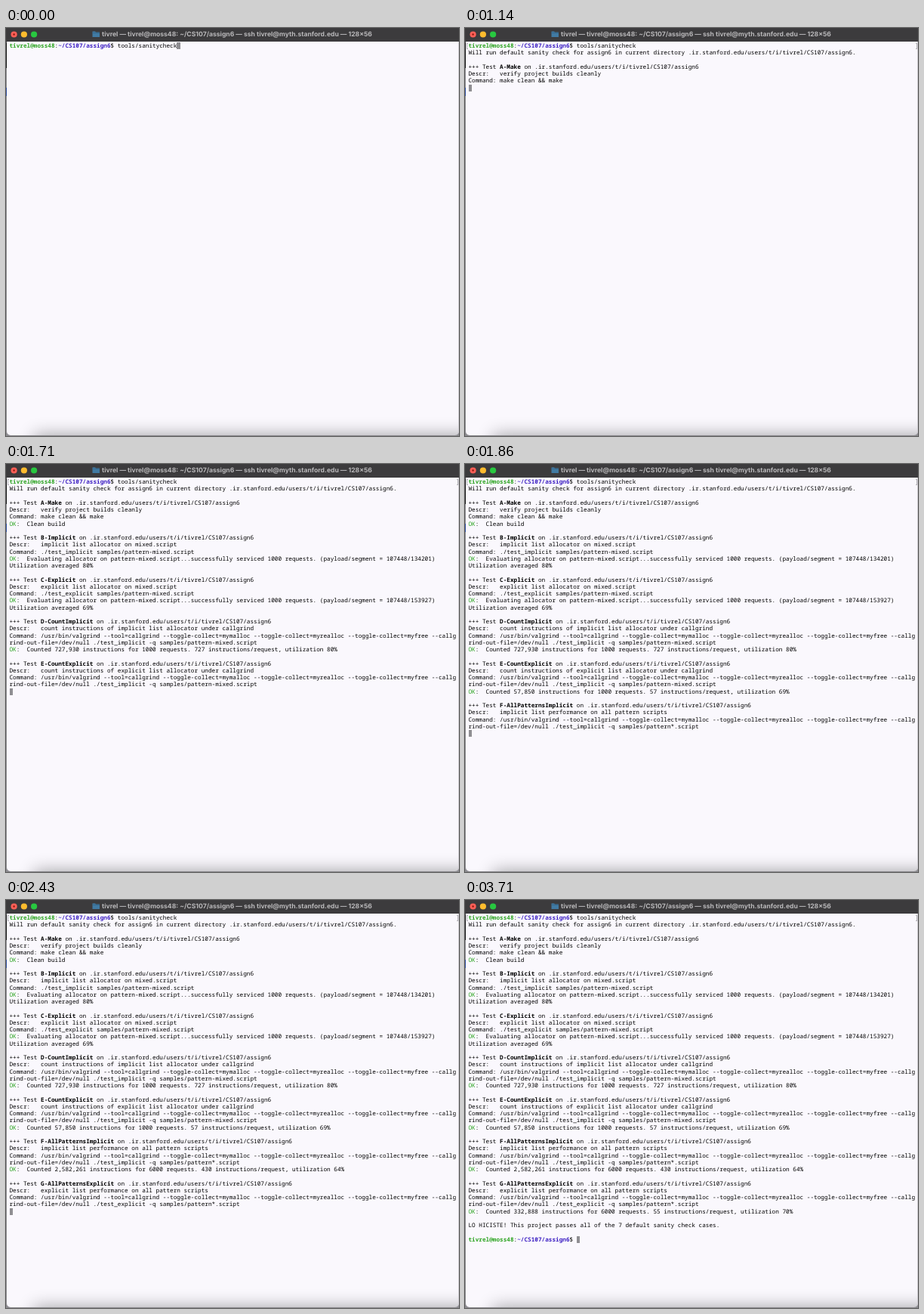
Recreate the animation shown at these times as an HTML page. Size 600 by 540 pixels, loop 4010 ms.

```html
<!DOCTYPE html>
<html lang="en">
<head>
<meta charset="utf-8">
<title>Sanity check</title>
<style>
  html, body { margin: 0; width: 100%; height: 100%; overflow: hidden; }
  body {
    position: relative;
    background: linear-gradient(#3c3b3d 20px, #111 20px 53px, #8b8a8e 53px 79px, #2c4c9c 79px 90px, #8b8a8e 90px);
    text-rendering: geometricPrecision;
  }
  body * { position: absolute; box-sizing: border-box; }
  #bar { width: 600px; height: 18px; background: #3c3b3d; }
  #title {
    left: 127px; top: 0; white-space: pre; color: #b9b8ba;
    font: bold 8.6px/18px Inter, sans-serif;
  }
  #page {
    left: 1px; top: 18px; width: 599px; height: 521px; overflow: hidden;
    background: #faf8fd; border-right: 1px solid #c9c7cc; border-radius: 0 0 5px 5px;
  }
  #shade { left: 40px; top: 524px; width: 620px; height: 40px; box-shadow: 0 0 22px 4px #0005; }
  #text {
    margin: 0; left: 4.5px; top: 20.2px; color: #000; white-space: pre;
    font: 500 7.715px/9.255px "Noto Sans Mono", monospace;
  }
  #text * { position: static; }
  #text b { font-weight: 700; }
  #text i { font-style: normal; color: #2fa524; }
  #text .user { color: #2fa524; }
  #text .path { color: #3f22c4; }
  #text .cursor {
    display: inline-block; position: relative; top: -1px;
    width: 4.63px; height: 9.255px; vertical-align: top; background: #8f8e92;
  }
  .mark { top: 20px; width: 2px; height: 8px; border: 1px solid #b5b3b9; }
</style>
</head>
<body>
<div id="bar">
  <svg width="130" height="18">
    <circle cx="10.6" cy="8.5" r="4.1" fill="#fe5f57"/>
    <circle cx="10.6" cy="8.5" r="1.2" fill="#8c1a10"/>
    <circle cx="23.9" cy="8.5" r="4.1" fill="#febc2e"/>
    <circle cx="37.1" cy="8.5" r="4.1" fill="#28c840"/>
    <path d="M114.5 4.5h3.5l1 1h5v6.5h-9.5z" fill="#417aa3"/>
    <path d="M114.5 6.5h9.5" stroke="#2f5f85" stroke-width=".7"/>
  </svg>
  <div id="title">tivrel — tivrel@moss48: ~/CS107/assign6 — ssh tivrel@myth.stanford.edu — 128×56</div>
</div>
<div id="page"><div id="shade"></div></div>
<pre id="text"></pre>
<div id="marks">
  <div class="mark" style="left: 2px; border-right: 0"></div>
  <div class="mark" style="left: 597px; border-left: 0"></div>
</div>
<script>
const LOOP = 4010, COLUMNS = 128;
const dir = '.ir.stanford.edu/users/t/i/tivrel/CS107/assign6';
const prompt = '<b class="user">tivrel@moss48</b>:<b class="path">~/CS107/assign6</b>$ ';

const wrap = line => line.slice(0, COLUMNS) + (line.length > COLUMNS ? '\n' + line.slice(COLUMNS) : '');
const test = (name, descr, command) =>
  `\n+++ Test <b>${name}</b> on ${dir}\nDescr:   ${descr}\n` +
  wrap('Command: ' + command).replace(/&/g, '&amp;') + '\n';
const ok = message => `<i>OK</i>:  ${message}\n`;

const evaluate = (letter, kind, segment, percent) =>
  test(`${letter}-${kind}`, `${kind.toLowerCase()} list allocator on mixed.script`,
    `./test_${kind.toLowerCase()} samples/pattern-mixed.script`) +
  ok('Evaluating allocator on pattern-mixed.script...successfully serviced 1000 requests. ' +
    `(payload/segment = 107448/${segment})`) +
  `Utilization averaged ${percent}%\n`;

const profile = (name, descr, kind, pattern) =>
  test(name, descr, '/usr/bin/valgrind --tool=callgrind' +
    ['mymalloc', 'myrealloc', 'myfree'].map(f => ' --toggle-collect=' + f).join('') +
    ` --callgrind-out-file=/dev/null ./test_${kind} -q samples/pattern${pattern}.script`);
const counted = (total, requests, each, percent) =>
  ok(`Counted ${total} instructions for ${requests} requests. ` +
    `${each} instructions/request, utilization ${percent}%`);

// Output appended at each time in ms
const steps = [
  [0, prompt + 'tools/sanitycheck'],
  [570, `\nWill run default sanity check for assign6 in current directory ${dir}.\n` +
    test('A-Make', 'verify project builds cleanly', 'make clean && make')],
  [1290, ok('Clean build') +
    evaluate('B', 'Implicit', 134201, 80) +
    evaluate('C', 'Explicit', 153927, 69) +
    profile('D-CountImplicit', 'count instructions of implicit list allocator under callgrind', 'implicit', '-mixed')],
  [1710, counted('727,930', 1000, 727, 80) +
    profile('E-CountExplicit', 'count instructions of explicit list allocator under callgrind', 'implicit', '-mixed')],
  [1860, counted('57,850', 1000, 57, 69) +
    profile('F-AllPatternsImplicit', 'implicit list performance on all pattern scripts', 'implicit', '*')],
  [2430, counted('2,582,261', 6000, 430, 64) +
    profile('G-AllPatternsExplicit', 'explicit list performance on all pattern scripts', 'explicit', '*')],
  [2860, counted('332,888', 6000, 55, 70) +
    '\nLO HICISTE! This project passes all of the 7 default sanity check cases.\n\n' + prompt],
];

const text = document.getElementById('text');
const marks = document.getElementById('marks');
let shown = 0;

function draw() {
  const time = performance.now() % LOOP;
  const done = steps.filter(([start]) => start <= time);
  if (done.length !== shown) {
    shown = done.length;
    text.innerHTML = done.map(step => step[1]).join('') + '<span class="cursor"></span>';
    marks.hidden = shown < 2;
  }
  requestAnimationFrame(draw);
}
draw();
</script>
</body>
</html>
```
